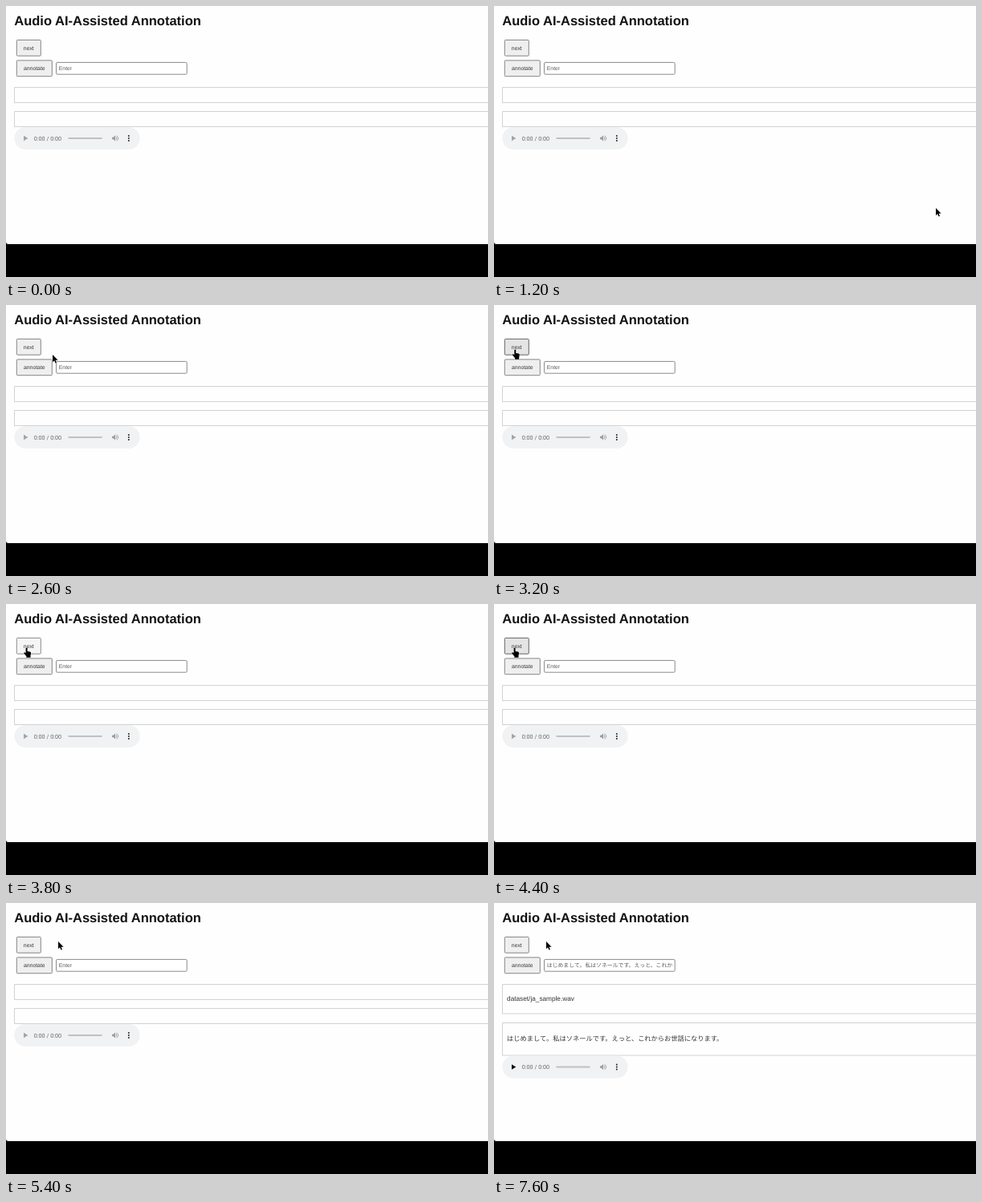
Write an HTML page that moves like this. It is 600 px wide and 338 px high and loops after 8 s.

```html
<!DOCTYPE html>
<html lang="ja">
<head>
<meta charset="utf-8">
<title>Audio annotation</title>
<style>
  html, body { margin: 0; width: 100%; height: 100%; overflow: hidden; background: #000; }
  svg { display: block; width: 600px; height: 338px; }
  text {
    font-family: "Liberation Sans", "Noto Sans CJK JP", "Noto Sans CJK", sans-serif;
    font-size: 6.87px; fill: #3a3a3a; text-rendering: geometricPrecision; white-space: pre;
  }
  .title { font-size: 16.5px; font-weight: bold; fill: #111; }
  .body { font-size: 8.24px; fill: #333; }
  .time { font-family: Roboto, sans-serif; font-size: 7.2px; fill: #666; }
  .hint { fill: #5c5c5c; }
  .button { fill: #efefef; stroke: #858585; }
  .button.hover { fill: #e4e4e4; stroke: #666; }
  .button.active { fill: #f5f5f5; stroke: #8c8c8c; }
  .field { fill: #fff; stroke: #8a8a8a; }
  .panel { fill: none; stroke: #d2d2d2; }
  .pointer { fill: #000; stroke: #fff; stroke-width: .7; paint-order: stroke; }
</style>
</head>
<body>
<svg viewBox="0 0 600 338">
  <rect width="600" height="338"/>
  <path d="M0 0H600V297H3Q0 297 0 294Z" fill="#fefefe"/>

  <text class="title" x="10.3" y="24">Audio AI-Assisted Annotation</text>

  <rect id="next" class="button" x="13.3" y="42.4" width="30" height="19.8" rx="1"/>
  <text x="28.3" y="54.5" text-anchor="middle">next</text>
  <rect class="button" x="13.3" y="67.9" width="44" height="19.8" rx="1"/>
  <text x="35.3" y="80.1" text-anchor="middle">annotate</text>

  <rect class="field" x="62.5" y="70.4" width="162.7" height="14.8" rx="1.5"/>
  <clipPath id="fieldClip"><rect x="65" y="71" width="158.2" height="14"/></clipPath>
  <text id="entry" class="hint" x="65.8" y="80.1" clip-path="url(#fieldClip)"></text>

  <rect id="filePanel" class="panel" x="10.5" y="101.5" width="620"/>
  <rect id="textPanel" class="panel" x="10.5" width="620"/>
  <g id="result">
    <text class="body" x="16.1" y="122.2">dataset/ja_sample.wav</text>
    <text id="speech" class="body" x="16.1" y="172.4"></text>
  </g>

  <g id="player">
    <rect x="10.5" width="156" height="28" rx="14" fill="#f0f2f3"/>
    <path id="play" d="M22 10.8L27.4 14L22 17.2Z"/>
    <text class="time" x="34.8" y="16.6">0:00 / 0:00</text>
    <rect x="77.3" y="13" width="42.5" height="2" rx="1" fill="#bfc0c1"/>
    <g fill="#9b9c9d">
      <path d="M132 12.7H133.6L136 10.5V17.5L133.6 15.3H132Z"/>
      <path d="M137 12.2Q138.6 14 137 15.8M137.6 10.6Q141.8 14 137.6 17.4" fill="none" stroke="#9b9c9d" stroke-width=".9"/>
    </g>
    <g fill="#222">
      <circle cx="152.8" cy="10.9" r="1"/>
      <circle cx="152.8" cy="14" r="1"/>
      <circle cx="152.8" cy="17.1" r="1"/>
    </g>
  </g>

  <path id="pointer" class="pointer"/>
</svg>
<script>
const LOOP = 8000, LOADED = 7600;
const SPEECH = "はじめまして。私はソネールです。えっと、これからお世話になります。";

const SHAPES = {
  none: "",
  arrow: "M0 0V9.2L2.1 7.3L3.5 10.5L5 9.9L3.6 6.8H6.6Z",
  beam: "M2 0H3.3L3.6 .4L3.9 0H5.2V.8H4V10.2H5.2V11H2V10.2H3.2V.8H2Z",
  hand: "M2.6 1.1Q3.6 -.3 4.6 1.1V5L8 5.6Q9.3 6 9.1 7.4L8.5 10.4V12.7H3.4V11.2L.3 7.6Q0 6 1.6 6.4L2.6 7.2Z"
};

// [start, shape, x, y]
const MOVES = [
  [0, "none", 0, 0],
  [1200, "arrow", 550, 252],
  [1400, "arrow", 270, 92],
  [1600, "arrow", 239, 79.3],
  [1800, "arrow", 239, 80],
  [2000, "arrow", 211, 95],
  [2200, "beam", 187, 77],
  [2400, "arrow", 93, 66],
  [2600, "arrow", 58, 62],
  [2800, "hand", 25, 55],
  [3000, "hand", 22, 55],
  [3200, "hand", 22.7, 55],
  [3800, "hand", 22, 54],
  [4600, "hand", 23.5, 54],
  [4800, "hand", 26, 54],
  [5000, "hand", 28, 53],
  [5200, "arrow", 49, 52],
  [5400, "arrow", 65, 48]
];

const BUTTON = [
  [0, ""], [2800, "hover"], [3800, "active"], [4000, "hover"], [5200, ""]
];

const el = id => document.getElementById(id);
const set = (id, attrs) => {
  for (const name in attrs) el(id).setAttribute(name, attrs[name]);
};
const stepAt = (steps, t) => steps.findLast(step => step[0] <= t);

el("speech").textContent = SPEECH;

function draw(now) {
  const t = now % LOOP;
  const loaded = t >= LOADED;
  const [, shape, x, y] = stepAt(MOVES, t);

  set("pointer", { d: SHAPES[shape], transform: `translate(${x} ${y})` });
  set("next", { class: "button " + stepAt(BUTTON, t)[1] });

  set("filePanel", { height: loaded ? 36.5 : 19 });
  set("textPanel", { y: loaded ? 149.5 : 131.5, height: loaded ? 40.5 : 19 });
  set("player", { transform: `translate(0 ${loaded ? 190.5 : 151})` });
  set("play", { fill: loaded ? "#111" : "#a3a4a5" });
  set("result", { visibility: loaded ? "visible" : "hidden" });
  el("entry").textContent = loaded ? SPEECH : "Enter";
}

function tick() {
  draw(performance.now());
  requestAnimationFrame(tick);
}
tick();
</script>
</body>
</html>
```
